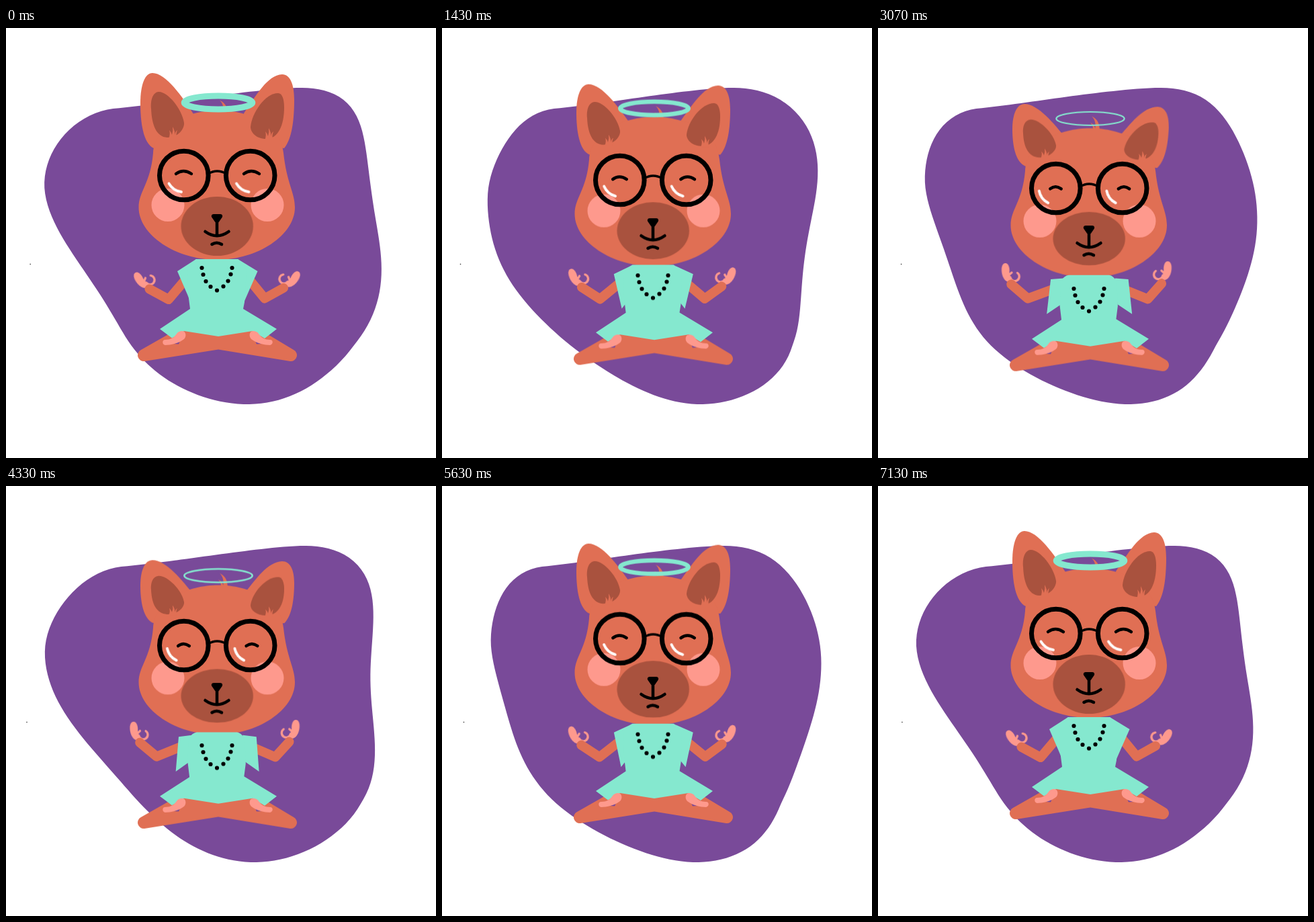
These frames come from a looping animation (640x640 px, 7160 ms). An HTML page:

```html
<!DOCTYPE html>
<html lang="en">
<head>
<meta charset="utf-8">
<title>Meditating dog</title>
<style>
  html, body { margin: 0; width: 100%; height: 100%; overflow: hidden; background: #fff; }
  svg { display: block; width: 100vw; height: 100vh; }

  .skin { fill: #e06f54; }
  .dark { fill: #a9523e; }
  .pink { fill: #fe998d; }
  .mint { fill: #85e8cf; }
  .purple { fill: #794a99; }
  .line { fill: none; stroke: #000; stroke-width: 4.5; stroke-linecap: round; }
  .arm { fill: none; stroke: #e06f54; stroke-width: 14; stroke-linecap: round; stroke-linejoin: round; }
  .finger { fill: none; stroke: #fe998d; stroke-width: 3.2; stroke-linecap: round; }
  .shine { fill: none; stroke: #fff; stroke-width: 3.8; stroke-linecap: round; }

  .drop, .pose, .morph, .halo {
    animation: 7.16s cubic-bezier(.3642, 0, .6358, 1) infinite;
  }
  .drop { animation-name: drop; }
  .pose { animation-name: pose; }
  .morph { animation-name: morph; }
  .halo { animation-name: halo; fill: none; stroke: #85e8cf; }
  .ears { --a: translateY(0px) scaleY(1); --b: translateY(60.4px) scaleY(.8214); }
  .twitch { animation: twitch 7.16s ease-in-out infinite; transform-origin: 380px 172px; }

  @keyframes drop {
    0%, 100% { transform: translateY(0); }
    50% { transform: translateY(var(--dy)); }
  }
  @keyframes pose {
    0%, 100% { transform: var(--a); }
    50% { transform: var(--b); }
  }
  @keyframes morph {
    0%, 100% { d: var(--a); }
    50% { d: var(--b); }
  }
  @keyframes halo {
    0%, 100% { transform: translateY(0); stroke-width: 9.2px; }
    50% { transform: translateY(25px); stroke-width: 1.7px; }
  }
  @keyframes twitch {
    0%, 40%, 46%, 100% { transform: translate(0, 0) rotate(0deg); }
    42.4%, 43.4% { transform: translate(1.5px, 2px) rotate(2deg); }
  }
</style>
</head>
<body>
<svg viewBox="0 0 640 640">
  <defs>
    <g id="hand">
      <path class="pink" d="M-1,-14 C4,-14 6,-6 5,0 C6,5 8,8 8,11 C7,14 4,15 1,13 C-4,10 -7,2 -6.5,-6 C-6,-11 -4,-14 -1,-14Z"/>
      <path class="finger" d="M17,.5 A6.7,6.7 0 1 1 6.5,7 M5,3 L8.5,0"/>
    </g>
    <g id="foot">
      <path class="purple" d="M249,470 L259,466 L257,470.500Z"/>
      <path class="pink" d="M262,451 C268,451 269,459 265,463 C258,469 245,472 237,472 C232,471 232,464 237,464 C245,464 250,461 254,455 C256,452 259,451 262,451Z"/>
    </g>
    <path id="tuft" class="skin" d="M-6,9 Q-3,2 -5,-4 Q-2,-1 -1,3 Q1,-3 0,-9 Q4,-2 3,3 Q4,-2 7,-4 Q4,3 7,9Z"/>
    <path id="shine" class="shine" d="M-22.5,12 A25.5,25.5 0 0 0 -4,24.5"/>
  </defs>

  <path id="blob" class="purple" d="M65,238 C65,195 95,128 160,120 C235,113 350,92 425,89
    C520,86 553.5,150 553.5,265 C553.5,340 548,420 517,470 C492,522 440,560 372,560
    C310,560 235,524 181.5,470 C137,424 65,310 65,238Z"/>
  <circle id="dot" cy="351.5" r=".8" fill="#222"/>

  <path class="skin drop" style="--dy:15.5px" d="M201,479 L245,454 L316,440 L388,455 L428,479 A9 9 0 0 1 423,496 L316,478.5 L206,496 A9 9 0 0 1 201,479Z"/>

  <use href="#hand" class="pose" style="--a:translate(200px,376px) rotate(-28deg); --b:translate(190px,363.4px) rotate(1.5deg)"/>
  <use href="#hand" class="pose" style="--a:translate(428px,374.5px) rotate(28deg) scale(-1,1); --b:translate(430.5px,360.5px) rotate(-1.5deg) scale(-1,1)"/>
  <path class="arm morph" style="--a:path('M270,371 L242,404 L213.5,388.5'); --b:path('M262,389 L222,402.5 L197.5,381')"/>
  <path class="arm morph" style="--a:path('M360,372 L385,402.5 L413,387'); --b:path('M366,390 L402.5,403.5 L422.5,380')"/>

  <path class="skin drop" style="--dy:25px" d="M318,107.5 C327,112 330,118 330,131 L322,131 C325,122 324,113 318,107.5Z M316,117 Q322,119 324,128 L320,130 Q321,122 316,117Z"/>

  <g class="skin ears pose">
    <path d="M220,179 C204,172 200,140 200,112 C200,84 207,67 218,67 C238,67 262,102 279,128 L270,170Z"/>
    <path class="twitch" d="M414,179 C426,165 429,135 429,107 C429,84 423,69 411,69 C389,70 372,101 354,127 L364,170Z"/>
  </g>

  <path class="skin drop" style="--dy:28px" d="M316,122.5 C270,122.5 222,145 219,186 C215,232 197.5,243 197.5,267 C197.5,308 253,345 314,345 C375,345 430,308 430,267 C430,245 418,232 413,186 C410,145 362,122.5 316,122.5Z"/>

  <g class="ears pose">
    <path class="dark" d="M227,95 C218,96 215,108 216,120 C217,145 224,162 240,163 C256,163 266,150 265,141 C262,120 240,94 227,95Z"/>
    <use href="#tuft" x="248" y="156"/>
    <g class="twitch">
      <path class="dark" d="M405,97 C411,97 414,106 414,118 C414,145 405,165 387,165 C372,165 364,155 364,147 C366,126 386,97 405,97Z"/>
      <use href="#tuft" x="391" y="158"/>
    </g>
  </g>

  <g class="pink drop" style="--dy:25px">
    <circle cx="241" cy="263.5" r="24.5"/>
    <circle cx="389" cy="263.5" r="24.5"/>
  </g>
  <ellipse class="dark pose" rx="53.7" ry="44" style="--a:translate(314.2px,295px) scaleY(1); --b:translate(314.2px,314.5px) scaleY(.9)"/>

  <g class="drop" style="--dy:18px">
    <path d="M309,277 H319 C322,277 323,280 321.5,282 L317,288.5 Q314,291.5 311,288.5 L306.5,282 C305,280 306,277 309,277Z"/>
    <path class="line" d="M314,288 V308 M296.5,303 Q314,315.5 331.5,303"/>
  </g>
  <path class="line drop" style="--dy:17px" d="M306.5,322 Q313.5,317.5 321,322"/>

  <path class="line morph" style="--a:path('M253,217 Q264,209 276,217'); --b:path('M256.5,240.5 Q264,234.5 272.5,240.5')"/>
  <path class="line morph" style="--a:path('M354,217 Q365,209 377,217'); --b:path('M358,240.5 Q366,234.5 374,240.5')"/>
  <use href="#shine" class="pose" style="--a:translate(265px,219.5px) rotate(0deg); --b:translate(265px,239.5px) rotate(20deg)"/>
  <use href="#shine" class="pose" style="--a:translate(365.5px,219.5px) rotate(0deg); --b:translate(365.5px,239.5px) rotate(20deg)"/>
  <g class="drop" style="--dy:20px" fill="none" stroke="#000" stroke-width="7">
    <circle cx="264.8" cy="219.5" r="36.3"/>
    <circle cx="363.7" cy="219.5" r="36.3"/>
    <path stroke-width="3.5" d="M301,217 Q314,209 328,217"/>
  </g>

  <g class="mint">
    <path class="morph" style="--a:path('M283,344 L255,362 L277,413 L285,395Z'); --b:path('M276,374 L257.2,374.6 L249.8,426.5 L272,412Z')"/>
    <path class="morph" style="--a:path('M345,344 L374.5,362 L352,413 L344,395Z'); --b:path('M353,374 L372.5,374.6 L379.5,426.5 L357,412Z')"/>
    <path class="morph" style="
      --a:path('M283,344 L345,344 Q350,347 358,360 L355,408 L353,418 L403,448 L385,462 L367,451 L316,459 L265,451 L247,461.5 L229,448 L274,418 L271,395 L270,360 Q278,347 283,344Z');
      --b:path('M284,369 L344,369 Q350,369.5 355,378 L357,414 L354.5,434 L403,463.5 L385,477.5 L367,466.5 L316,474.5 L265,466.5 L247,477 L229,463.5 L273,435 L270.5,414 L272,378 Q277,369.5 284,369Z')"/>
  </g>
  <path class="drop" style="--dy:32.5px" fill="none" stroke="#000" stroke-width="6.2" stroke-linecap="round"
    d="M291.5,357h0M293.5,367h0M297.5,377h0M304.5,385h0M314,390.5h0M323.5,384.5h0M330.5,376.5h0M334.5,366.5h0M336.5,357h0"/>

  <g class="drop" style="--dy:15.5px">
    <use href="#foot"/>
    <use href="#foot" transform="translate(630 0) scale(-1 1)"/>
  </g>

  <ellipse class="halo" cx="316" cy="111" rx="50.7" ry="10"/>
</svg>

<script>
  const SIZE = 640;
  const PERIOD = 7160 / 3;
  const WAVELENGTH = 360;
  const SWAY = 26;
  const SAMPLES = 180;

  const blob = document.getElementById('blob');
  const dot = document.getElementById('dot');

  const step = blob.getTotalLength() / SAMPLES;
  const outline = Array.from({ length: SAMPLES }, (_, i) => blob.getPointAtLength(i * step));

  // The sway fades out towards the edges of the stage.
  const fade = (v, reach) => 1 - Math.exp(-Math.min(v, SIZE - v) / reach);

  // A sine wave travels up the stage and shifts each row sideways.
  function swayed(x, y, phase) {
    const angle = 2 * Math.PI * (phase - .74 + (y - 125) / WAVELENGTH);
    return x + SWAY * fade(x, 150) * fade(y, 80) * Math.cos(angle);
  }

  function draw(now) {
    const phase = now / PERIOD % 1;
    const points = outline.map(({ x, y }) => swayed(x, y, phase).toFixed(2) + ',' + y.toFixed(2));
    blob.setAttribute('d', 'M' + points.join('L') + 'Z');
    dot.setAttribute('cx', swayed(32.4, 351.5, phase));
    requestAnimationFrame(draw);
  }
  draw(0);
</script>
</body>
</html>
```
